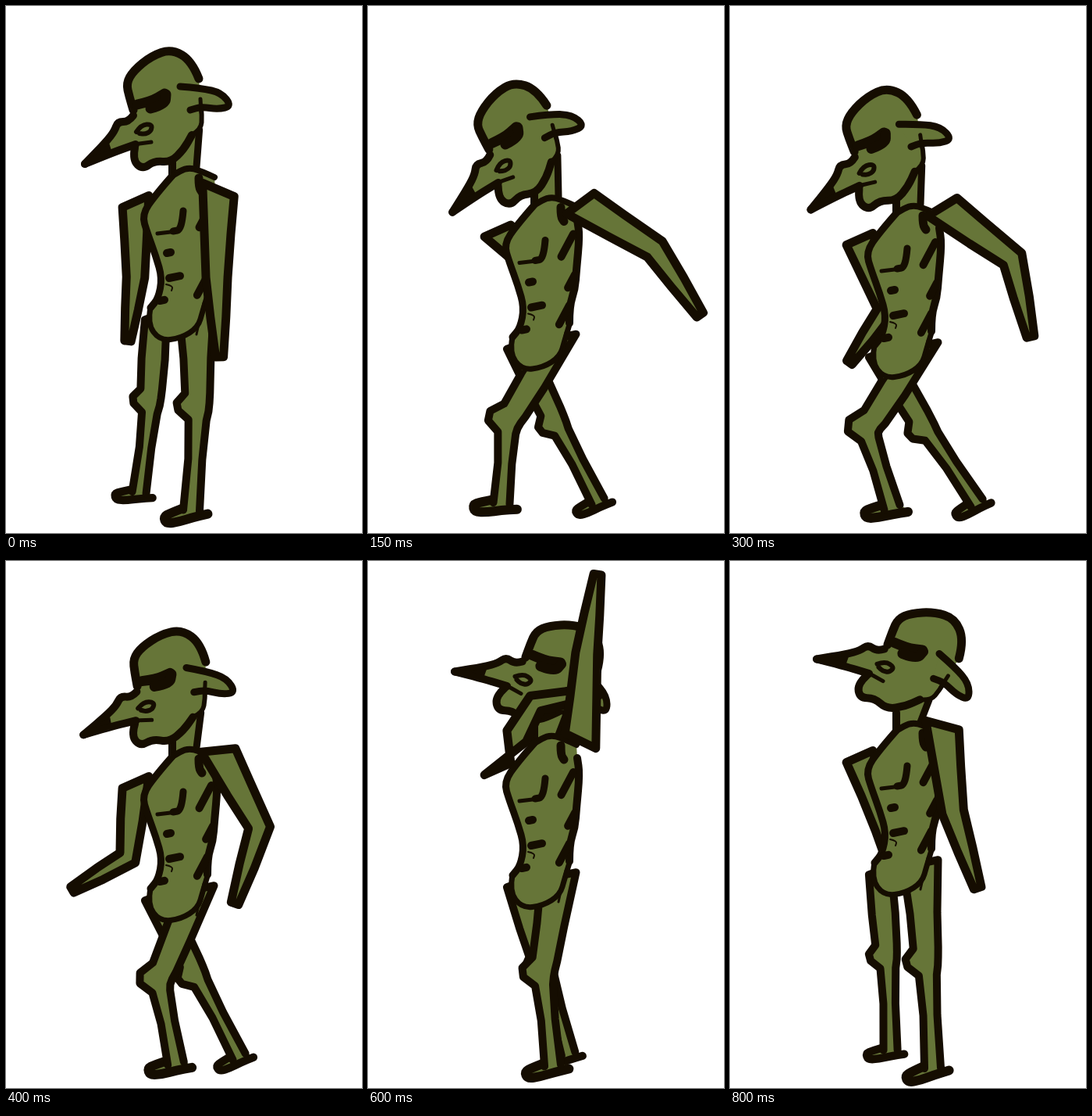
Animation, 456 px wide and 674 px high, one loop 0.85 s. Source, as an HTML page with a canvas:

```html
<!DOCTYPE html>
<html lang="en">
<head>
<meta charset="utf-8">
<title>Goblin slash</title>
<style>
html, body { margin: 0; width: 100%; height: 100%; overflow: hidden; background: #fff; }
canvas { display: block; }
</style>
</head>
<body>
<canvas id="stage" width="456" height="674"></canvas>
<script>
const ctx = document.getElementById('stage').getContext('2d');
const INK = '#150d01', SKIN = '#667538';
const LOOP = 850, STEP = 50, RAD = Math.PI / 180;
ctx.lineJoin = ctx.lineCap = 'round';

// Key poses: crouch depth, head tilt, near shoulder height,
// upper and lower arm angles, and where each foot stands.
const POSES = [
  { t: 0, drop: 0, tilt: 0, shoulder: 235, near: [91, 88], far: [90, 97], feet: [238, 171] },
  { t: 100, drop: 12, tilt: -7.5, shoulder: 233, near: [52, 65], far: [43, 100], feet: [145, 256] },
  { t: 200, drop: 63, tilt: -16, shoulder: 272, near: [11, 46], far: [43, 100], feet: [198, 334] },
  { t: 400, drop: 33, tilt: 6, shoulder: 242, near: [62, 108], far: [96, 150], feet: [218, 299] },
  { t: 500, drop: 23, tilt: 36, shoulder: 250, near: [163, 177], far: [180, 221], feet: [227, 277] },
  { t: 600, drop: 16, tilt: 36.5, shoulder: 230, near: [274, 278], far: [300, 350], feet: [237, 257] },
  { t: 750, drop: 4, tilt: 36.5, shoulder: 212, near: [70, 64], far: [425, 430], feet: [254, 218] },
  { t: 800, drop: 0, tilt: 36.5, shoulder: 210, near: [83, 72], far: [431, 435], feet: [260, 206] }
];
// Position along the limb (1 is the middle joint), left and right offsets.
const ARM = [[.5, -17, 17], [1, -14, 14], [1.5, -10, 10], [2, -5, 5]];
const LEG = [[.5, -18, 17], [.85, -17, 15], [.95, -28, 14], [1.03, -26, 13],
  [1.12, -12, 11], [1.5, -9, 9], [2, -11, 10]];

const clamp = v => Math.min(1, Math.max(0, v));
const mix = (a, b, k) => Array.isArray(a) ? a.map((v, i) => mix(v, b[i], k)) : a + (b - a) * k;
const reach = ([x, y], deg, len) => [x + len * Math.cos(deg * RAD), y + len * Math.sin(deg * RAD)];

function poseAt(t) {
  const next = Math.max(1, POSES.findIndex(p => p.t >= t));
  const a = POSES[next - 1], b = POSES[next];
  const k = (t - a.t) / (b.t - a.t), pose = {};
  for (const key in a) pose[key] = mix(a[key], b[key], k);
  return pose;
}

function trace(p, smooth) {
  const end = p.length - 2;
  ctx.beginPath();
  ctx.moveTo(p[0], p[1]);
  for (let i = 2; i < end; i += 2) {
    if (smooth) ctx.quadraticCurveTo(p[i], p[i + 1], (p[i] + p[i + 2]) / 2, (p[i + 1] + p[i + 3]) / 2);
    else ctx.lineTo(p[i], p[i + 1]);
  }
  ctx.lineTo(p[end], p[end + 1]);
}

function fill(p, color = SKIN) {
  trace(p, false);
  ctx.fillStyle = color;
  ctx.fill();
}

function ink(width, p, smooth = true) {
  trace(p, smooth);
  ctx.lineWidth = width;
  ctx.strokeStyle = INK;
  ctx.stroke();
}

// Outline around two bones, starting with a straight cap at the first joint.
function limb([root, joint, tip], shape, scale, capAngle, capHalf) {
  const angle = (a, b) => Math.atan2(b[1] - a[1], b[0] - a[0]);
  const first = angle(root, joint), turn = angle(joint, tip) - first;
  const bend = Math.atan2(Math.sin(turn), Math.cos(turn));
  const left = [...reach(root, capAngle, -capHalf)], right = [...reach(root, capAngle, capHalf)];
  for (const [s, l, r] of shape) {
    const [x, y] = s < 1 ? mix(root, joint, s) : mix(joint, tip, s - 1);
    const a = first + bend * clamp((s - .85) / .3);
    const nx = Math.sin(a) * scale, ny = -Math.cos(a) * scale;
    left.unshift(x + nx * l, y + ny * l);
    right.push(x + nx * r, y + ny * r);
  }
  return left.concat(right);
}

function drawArm(shoulder, [upper, lower], scale, capAngle) {
  const elbow = reach(shoulder, upper, scale > .9 ? 112 : 97);
  const hand = reach(elbow, lower, scale > .9 ? 102 : 82);
  const p = limb([shoulder, elbow, hand], ARM, scale, capAngle, 22 * scale);
  p.push(p[0], p[1]);
  fill(p);
  ink(11, p, false);
}

function drawLeg(hip, thighAngle, ankle, scale, capAngle) {
  ctx.save();
  ctx.translate(...ankle);
  ctx.rotate((205 - ankle[0]) * .15 * RAD);
  ctx.scale(scale, scale);
  const foot = [-11, -4, -28, 1, -37, 5, -34, 14, -18, 13, 0, 9, 20, 6];
  fill([...foot, 11, -4]);
  ink(12, foot);
  ctx.restore();
  const knee = reach(hip, thighAngle, scale < 1 ? 111 : 127);
  const p = limb([hip, knee, ankle], LEG, scale, capAngle, scale < 1 ? 15 : 23);
  fill(p);
  ink(10, p, false);
}

// The feet slide on sloping ground lines; the thighs swing with stride and crouch.
function drawLegs(drop, [nearX, farX]) {
  drawLeg([192, 396 + drop], 88 - .24 * (farX - 192), [farX, 607 + .09 * farX], .86, -20);
  drawLeg([244, 387 + drop], 88 + .62 * drop - .13 * (nearX - 244), [nearX, 612 + .14 * nearX], 1, -12);
}

function drawHead() {
  const skull = [247, 93, 238, 70, 212, 55, 186, 64, 163, 83, 154, 99, 158, 116, 163, 133];
  const nose = [163, 140, 157, 148, 143, 148, 139, 160, 128, 174, 101, 202];
  const jaw = [165, 181, 162, 197, 175, 209, 190, 198, 211, 200, 228, 183, 238, 165];
  const cheek = [238, 165, 250, 158, 251, 140, 249, 118];
  const ear = [223, 103, 250, 105, 276, 111, 289, 128, 272, 132, 250, 129, 236, 133];
  fill([...skull, ...nose, ...jaw, ...cheek]);
  ink(11, skull);
  ink(10, nose);
  ink(10, jaw);
  ink(6, cheek);
  fill([97, 204, 132, 175, 137, 191, 103, 206], INK);
  ink(10, [101, 202, 135, 188, 166, 177]);
  ink(13, [168, 126, 186, 122, 203, 112]);
  ink(13, [185, 131, 204, 126, 205, 113]);
  ink(6, [167, 161, 173, 152, 187, 151, 186, 160, 178, 164, 171, 163]);
  ink(5, [171, 176, 186, 174]);
  fill(ear);
  ink(9, ear);
  ink(5, [249, 119, 250, 136]);
}

function drawNeck(tilt) {
  const nape = reach([222, 179], tilt - 39, 33);
  fill([213, 180, ...nape, 244, 212, 213, 218]);
  ink(10, [213, 194, 213, 216]);
  ink(9, [...nape, 244, 206]);
}

function drawTorso() {
  const collar = [267, 219, 250, 211, 232, 206, 213, 217];
  const front = [213, 217, 191, 242, 174, 267, 181, 290, 192, 320, 200, 348, 195, 374, 185, 386];
  const pelvis = [185, 386, 181, 406, 197, 428, 224, 425, 246, 411, 252, 390, 258, 370];
  const back = [258, 368, 258, 346, 265, 325, 267, 300, 271, 256, 268, 236];
  fill([...collar, ...front, ...pelvis, ...back]);
  ink(8, collar);
  ink(9, front);
  ink(7, pelvis);
  ink(10, back);
  ink(11, [247, 220, 247, 232, 251, 238]);
  for (const [x, y, len] of [[263, 254, 33], [265, 306, 19], [258, 345, 28]]) {
    ink(10, [x, y, ...reach([x, y], 118, len)]);
  }
  ink(3, [253, 380, 244, 420]);
  ink(9, [227, 262, 225, 286, 214, 288]);
  ink(5, [219, 288, 194, 291]);
  for (const [x, y, len] of [[206, 316, 5], [209, 348, 14], [197, 377, 6]]) {
    ink(10, [x, y, x + len, y - len * .2]);
  }
  ink(2, [205, 356, 214, 358, 212, 364]);
}

function shifted(drop, paint) {
  ctx.save();
  ctx.translate(0, drop);
  paint();
  ctx.restore();
}

function draw(t) {
  const { drop, tilt, shoulder, near, far, feet } = poseAt(t);
  ctx.fillStyle = '#fff';
  ctx.fillRect(0, 0, 456, 674);
  drawLegs(drop, feet);
  shifted(drop, () => {
    drawNeck(tilt);
    ctx.translate(222, 179);
    ctx.rotate(tilt * RAD);
    ctx.translate(-222, -179);
    drawHead();
  });
  drawArm([166, 250 + drop], far, .84, -24);
  shifted(drop, drawTorso);
  drawArm([272, shoulder], near, 1, near[0] - 68);
}

function tick() {
  const t = performance.now() % LOOP;
  draw(Math.floor(t / STEP) * STEP);
  requestAnimationFrame(tick);
}
tick();
</script>
</body>
</html>
```
